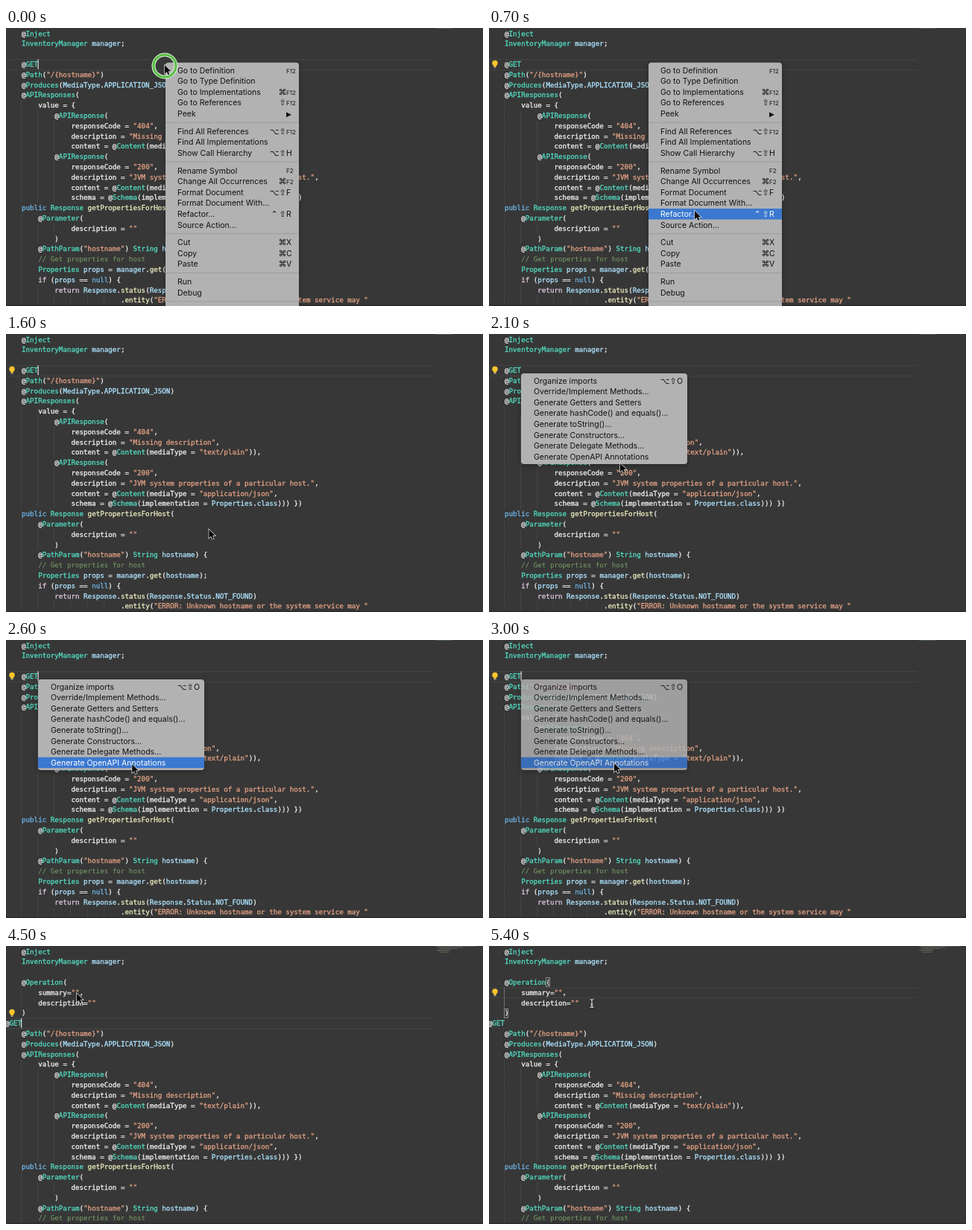
Recreate the animation shown at these times as an HTML page with a canvas. Size 640x374 px, loop 5500 ms.

```html
<!DOCTYPE html>
<html lang="en">
<head>
<meta charset="utf-8">
<title>Editor source action</title>
<style>
html, body { margin: 0; width: 100%; height: 100%; overflow: hidden; background: #373737; }
canvas { display: block; }
</style>
</head>
<body>
<canvas id="stage" width="640" height="374"></canvas>
<script>
const screen2d = document.getElementById('stage').getContext('2d');
const layer = Object.assign(document.createElement('canvas'), { width: 640, height: 374 });
const layer2d = layer.getContext('2d');
let ctx = screen2d;

const LOOP = 5500, STEP = 100;
const LEFT = 21, CHAR = 5.539, LINE = 13.8, FIRST = 7.3;
const CODE_FONT = '9.2px "DejaVu Sans Mono", monospace';
const MENU_FONT = '10.5px Inter, sans-serif';
const ROW = 14.57, GAP = 9.2;
const INSERTED = 3600, CLICKED = 4700;

const head = ['@Inject', 'InventoryManager manager;', ''];
const operation = ['@Operation(', '    summary="",', '    description=""', ')'];
const body = `@Path("/{hostname}")
@Produces(MediaType.APPLICATION_JSON)
@APIResponses(
    value = {
        @APIResponse(
            responseCode = "404",
            description = "Missing description",
            content = @Content(mediaType = "text/plain")),
        @APIResponse(
            responseCode = "200",
            description = "JVM system properties of a particular host.",
            content = @Content(mediaType = "application/json",
            schema = @Schema(implementation = Properties.class))) })
public Response getPropertiesForHost(
    @Parameter(
            description = ""
        )
    @PathParam("hostname") String hostname) {
    // Get properties for host
    Properties props = manager.get(hostname);
    if (props == null) {
        return Response.status(Response.Status.NOT_FOUND)
                        .entity("ERROR: Unknown hostname or the system service may "`.split('\n');
const before = [...head, '@GET', ...body];
const after = [...head, ...operation, '@GET', ...body];

// Token groups, in the order of their colours
const TOKENS = /(\/\/.*)|("[^"]*")|\b(public|null)\b|\b(if|return)\b|((?<=@)\w+|\b[A-Z]\w+(?= \w))|(\w+(?=\())|\b([A-Z]\w+|class|manager|props|hostname)\b|(\w+|[^\s\w])/g;
const COLORS = ['#78a266', '#e3a184', '#6db3e6', '#dcc6dc', '#52dcc2', '#ecebbe', '#aee4ff', '#f2f2f2'];

// Menu rows are "label|modifiers|key"; an empty string is a separator
const contextMenu = {
  x: 214, y: 46.5, w: 179, h: 345, textX: 230, textY: 57, keyX: 376, from: -1, fade: 1300,
  rows: ['Go to Definition||F12', 'Go to Type Definition', 'Go to Implementations|⌘|F12',
    'Go to References|⇧|F12', 'Peek||▶', '', 'Find All References|⌥⇧|F12',
    'Find All Implementations', 'Show Call Hierarchy|⌥⇧|H', '', 'Rename Symbol||F2',
    'Change All Occurrences|⌘|F2', 'Format Document|⌥⇧|F', 'Format Document With...',
    'Refactor...|⌃⇧|R', 'Source Action...', '', 'Cut|⌘|X', 'Copy|⌘|C', 'Paste|⌘|V', '',
    'Run', 'Debug', '']
};
const sourceMenu = {
  x: 43, y: 53, w: 223, h: 122, textX: 60, textY: 63, keyX: 252, from: 1900, fade: 2960,
  rows: ['Organize imports|⌥⇧|O', 'Override/Implement Methods...', 'Generate Getters and Setters',
    'Generate hashCode() and equals()...', 'Generate toString()...', 'Generate Constructors...',
    'Generate Delegate Methods...', 'Generate OpenAPI Annotations']
};

// Pointer path: time, x, y
const path = [[0, 213, 50], [200, 213, 50], [700, 276, 246], [1300, 280, 270], [1500, 280, 270],
  [2100, 176, 174], [2300, 176, 174], [2700, 168, 166], [3300, 168, 166], [4400, 95, 64],
  [4700, 95, 64], [5200, 138, 77], [5500, 138, 77]];

const clamp = v => Math.max(0, Math.min(1, v));
const lineY = i => FIRST + LINE * i;

function pointerAt(t) {
  const i = path.findIndex(p => p[0] > t);
  const [t0, x0, y0] = path[i - 1], [t1, x1, y1] = path[i];
  const u = (t - t0) / (t1 - t0), k = u * u * (3 - 2 * u);
  return { x: x0 + (x1 - x0) * k, y: y0 + (y1 - y0) * k };
}

function text(str, x, y, font, color, { align = 'left', weight = 0 } = {}) {
  ctx.font = font;
  ctx.fillStyle = ctx.strokeStyle = color;
  ctx.textAlign = align;
  ctx.fillText(str, x, y);
  if (weight) {
    ctx.lineWidth = weight;
    ctx.strokeText(str, x, y);
  }
}

function rect(x, y, w, h, color) {
  ctx.fillStyle = color;
  ctx.fillRect(x, y, w, h);
}

function drawLine(str, i) {
  const indent = str.search(/\S|$/), y = lineY(i);
  const start = str === '@GET' && i === 7 ? -1 : LEFT;
  for (let c = 0; c < indent; c += 4) rect(Math.round(LEFT + c * CHAR) - 1, y - LINE / 2, 1, LINE, '#444');
  for (const m of str.matchAll(TOKENS)) {
    const kind = m.slice(1).findIndex(g => g !== undefined);
    text(m[0], start + m.index * CHAR, y + 3.3, CODE_FONT, COLORS[kind], { weight: kind ? 0.3 : 0 });
  }
}

function drawBulb(y) {
  ctx.fillStyle = '#fbc52d';
  ctx.beginPath();
  ctx.arc(8, y - 1.4, 3.7, 0, 7);
  ctx.fill();
  rect(6.3, y + 1.6, 3.4, 1.8, '#fbc52d');
  rect(6.5, y + 3.8, 3, 1, '#c9c9c9');
}

function drawMinimap(inserted) {
  for (let i = 0; i < (inserted ? 6 : 1); i++) {
    const width = inserted ? 54 / (1 + i * 0.6) : 22;
    rect(577 + i % 3 * 2, i * 1.6, width, 0.6, i % 2 ? '#806a5c' : '#5f7570');
  }
}

function drawEditor(t) {
  const inserted = t >= INSERTED, clicked = t >= CLICKED;
  const current = clicked ? 4 : inserted ? 7 : 3;
  rect(0, 0, 640, 374, '#373737');
  for (const dy of [-0.5, 0.5]) rect(0, Math.round(lineY(current) + dy * LINE), 574, 1, '#434343');
  (inserted ? after : before).forEach(drawLine);
  drawMinimap(inserted);

  if (clicked) {
    rect(20, lineY(3.5), 1, LINE * 2, '#707070');
    ctx.strokeStyle = '#8a8a8a';
    ctx.lineWidth = 1;
    ctx.strokeRect(76.5, 42.5, 5, 12);
    ctx.strokeRect(20.5, 84.5, 5, 12);
  }
  const caretX = clicked ? LEFT + 13 * CHAR : inserted ? 20 : 42.5;
  if (Math.floor(t / 650) % 2 === 0 && t < 5200) rect(caretX, lineY(current) - 6.5, 1.2, 13, '#e4e4e4');

  if (clicked) drawBulb(lineY(4));
  else if (t >= INSERTED + 400) drawBulb(lineY(6));
  else if (t >= 400 && !inserted) drawBulb(lineY(3));
  rect(0, 372.5, 640, 1.5, '#2b2b2b');
}

function drawMenu(menu, pointer) {
  ctx.save();
  ctx.shadowColor = 'rgba(0,0,0,.28)';
  ctx.shadowBlur = 7;
  ctx.shadowOffsetY = 2;
  ctx.fillStyle = '#b2b2b2';
  ctx.beginPath();
  ctx.roundRect(menu.x, menu.y, menu.w, menu.h, 4);
  ctx.fill();
  ctx.restore();

  let y = menu.textY;
  for (const row of menu.rows) {
    if (!row) {
      rect(menu.x, y - 3.2, menu.w, 1, '#9c9c9c');
      y += GAP;
      continue;
    }
    const [label, mods = '', key = ''] = row.split('|');
    const hover = pointer.x >= menu.x && Math.abs(pointer.y - y) < ROW / 2;
    if (hover) rect(menu.x, y - ROW / 2, menu.w, ROW, '#3b78d0');
    const color = hover ? '#fff' : '#111';
    text(label, menu.textX, y + 3.7, MENU_FONT, color);
    [...mods].reverse().forEach((m, i) =>
      text(m, menu.keyX - 5 - i * 11, y + 3.7, '11px "DejaVu Sans", sans-serif', color, { align: 'center' }));
    const keyFont = /F\d/.test(key) ? '8px Inter, sans-serif'
      : key === '▶' ? '9px "DejaVu Sans", sans-serif' : MENU_FONT;
    text(key, menu.keyX, y + 3.5, keyFont, color);
    y += ROW;
  }
}

// Menus fade as one flat group, so they are painted on their own layer
function showMenu(menu, t, pointer) {
  const alpha = t < menu.from ? 0 : 1 - clamp((t - menu.fade) / 250);
  if (!alpha) return;
  ctx = layer2d;
  ctx.clearRect(0, 0, 640, 374);
  drawMenu(menu, pointer);
  ctx = screen2d;
  ctx.globalAlpha = alpha;
  ctx.drawImage(layer, 0, 0);
  ctx.globalAlpha = 1;
}

function drawRing(t, { x, y }) {
  ctx.globalAlpha = 1 - clamp((t - 50) / 250);
  for (const [width, color] of [[5, '#e6f2e0'], [3, '#55bd43']]) {
    ctx.lineWidth = width;
    ctx.strokeStyle = color;
    ctx.beginPath();
    ctx.arc(x, y + 1, 15, 0, 7);
    ctx.stroke();
  }
  ctx.globalAlpha = 1;
}

const arrow = new Path2D('M0 0V11.5L2.7 9L4.5 13L6.4 12.2L4.7 8.3H8.3Z');
const beam = new Path2D('M-2.5 -5.5Q0 -5.5 0 -3.5Q0 -5.5 2.5 -5.5M0 -3.5V3.5M-2.5 5.5Q0 5.5 0 3.5Q0 5.5 2.5 5.5M-1.5 1.5H1.5');

function drawPointer(t, { x, y }) {
  ctx.save();
  ctx.translate(x, y);
  if (t > CLICKED) {
    for (const [width, color] of [[2.4, '#222'], [1.1, '#eee']]) {
      ctx.lineWidth = width;
      ctx.strokeStyle = color;
      ctx.stroke(beam);
    }
  } else {
    ctx.lineWidth = 1.4;
    ctx.strokeStyle = '#ddd';
    ctx.stroke(arrow);
    ctx.fillStyle = '#0a0a0a';
    ctx.fill(arrow);
  }
  ctx.restore();
}

function render(now) {
  const t = Math.floor(now % LOOP / STEP) * STEP;
  const pointer = pointerAt(t);
  drawEditor(t);
  showMenu(contextMenu, t, pointer);
  showMenu(sourceMenu, t, pointer);
  drawRing(t, pointer);
  drawPointer(t, pointer);
}

const begin = performance.now();
function tick() {
  render(performance.now() - begin);
  requestAnimationFrame(tick);
}
tick();
</script>
</body>
</html>
```
